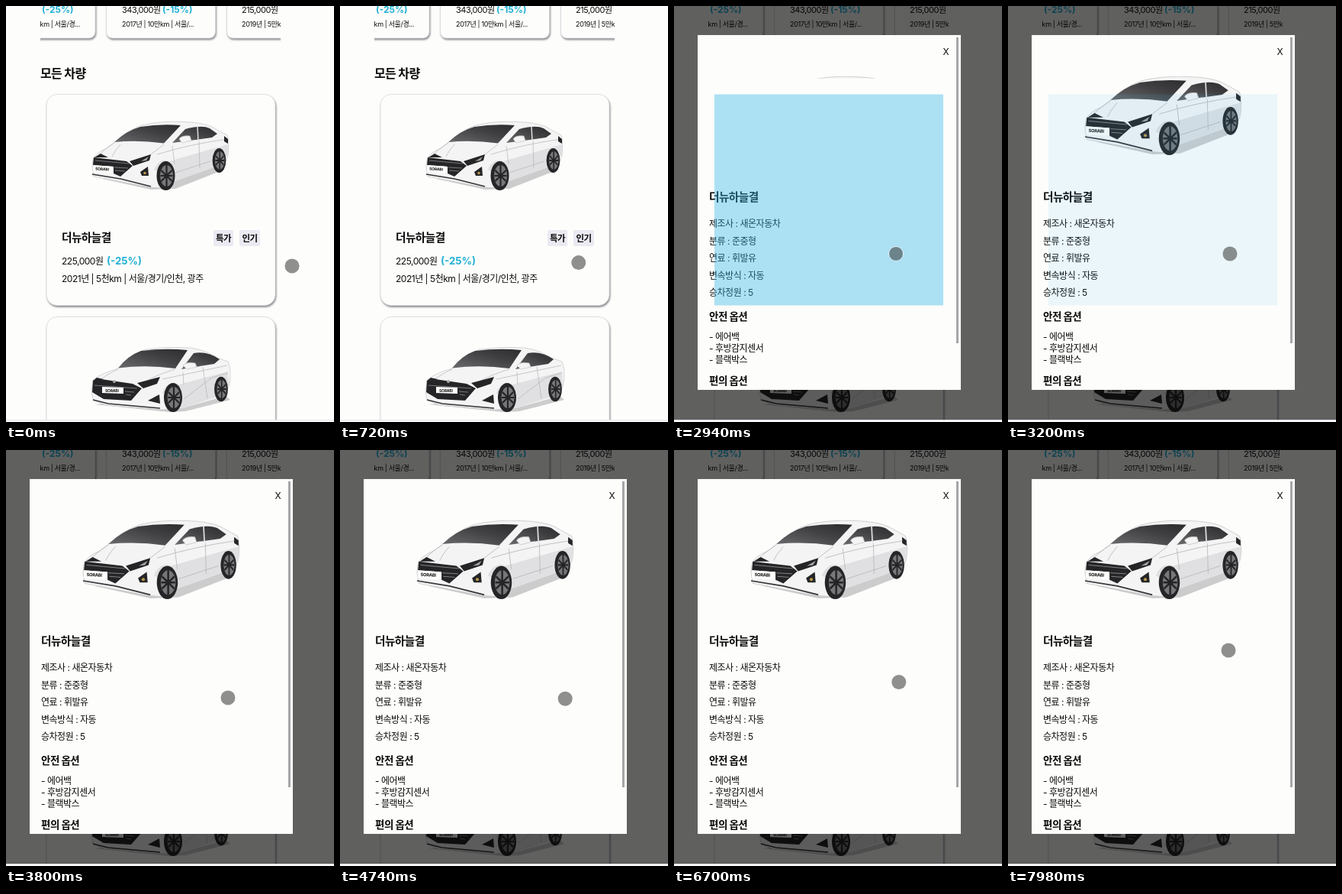
These frames come from a looping animation (430x544 px, 8 s). An HTML page:

```html
<!DOCTYPE html>
<html lang="ko">
<head>
<meta charset="utf-8">
<title>차량 목록</title>
<style>
  html, body { margin: 0; width: 100%; height: 100%; overflow: hidden; background: #fdfdfb; }
  svg { display: block; width: 430px; height: 544px; }
  text { font: 12px Inter, 'Noto Sans CJK KR', 'Noto Sans CJK', sans-serif; letter-spacing: -.04em; fill: #0c0c0c; }
  .title { font-size: 14.7px; font-weight: 700; }
  .head { font-size: 13.5px; font-weight: 700; }
  .small { font-size: 9px; }
  .price { font-size: 11px; }
  .sale { font-size: 13.3px; font-weight: 700; fill: #22b0d6; letter-spacing: 0; }
  .sale.mini { font-size: 12px; }
  .bold { font-weight: 700; }
  .tag { font-size: 11.5px; font-weight: 700; }
  .plate { font-size: 5px; font-weight: 700; }
  .page { fill: #fdfdfb; }
  .card { fill: #fdfdfb; stroke: #d9d9de; stroke-width: .8; filter: drop-shadow(1px 2px 1px rgba(50, 50, 60, .55)); }
  .badge { fill: #ebeaf3; }
  .paint { fill: #f4f4f4; stroke: #c6c6c8; stroke-width: .7; }
  .shade { fill: #e0e0e2; }
  .glass { fill: url(#tint); }
  .dark { fill: #252527; }
  .rim { fill: #77777a; }
  .spokes { stroke: #252527; stroke-width: 2.2; }
  .line { fill: none; stroke: #b4b4b7; stroke-width: .7; }
  .trim { fill: none; stroke: #8c8c90; stroke-width: .8; }
  .lip { fill: none; stroke: #353538; stroke-width: 1.5; }
  .shadow { fill: #a5a5a8; opacity: .55; }
</style>
</head>
<body>
<svg viewBox="0 0 430 544">
  <defs>
    <linearGradient id="tint" x1="0" y1="1" x2="1" y2="0">
      <stop offset="0" stop-color="#6b6b6e"/>
      <stop offset=".6" stop-color="#404043"/>
      <stop offset="1" stop-color="#2c2c2e"/>
    </linearGradient>
    <clipPath id="content"><rect x="45" width="315" height="541"/></clipPath>
    <clipPath id="panel"><rect x="31" y="38" width="345" height="464"/></clipPath>
    <clipPath id="loaded"><rect id="loadedArea" x="95" y="92" width="220" height="0"/></clipPath>
    <g id="wheel">
      <ellipse class="dark" rx="12" ry="19"/>
      <ellipse class="rim" cx="1" rx="8.5" ry="14"/>
      <path class="spokes" d="M1-14V14M-6-7L8 7M-6 7L8-7M-7 0H9"/>
      <ellipse class="dark" cx="1" rx="2" ry="3"/>
    </g>
    <g id="sedan">
      <path class="shadow" d="M126 226L190 240L222 239L286 214L284 204L190 226Z"/>
      <path class="paint" d="M113 211L114 200Q119 191 132 186L144 177Q160 162 178 156Q202 150 232 151.500Q256 152 270 158L290 169Q293 179 291 195L288 203L270 212L222 229L203 238L188 237L115 223Z"/>
      <path class="shade" d="M194 214Q201 198 214 203L228 199L291 181L291 195L270 212L222 229Z"/>
      <path class="glass" d="M142 178Q158 163 176 158Q202 154 229 156L207 179.500Q174 175 142 178Z"/>
      <path class="glass" d="M218 179L235 161Q257 155 267 160L277 167L270 172Z"/>
      <path d="M251 157L252 176" stroke="#dedee0" stroke-width="1.500"/>
      <path class="line" d="M207 181L190 194M142 179Q128 188 121 196M150 181Q142 190 139 197M218 183L221 207M253 177L254 212M198 194Q240 181 290 174M222 218L268 203"/>
      <path class="dark" d="M115 198L158 203L166 209L150 223L141 219L141 210L114 208Z"/>
      <path class="trim" d="M117 202L161 206M142 211L160 212M143 215L156 216"/>
      <path class="dark" d="M162 203L190 194L188 202L167 209ZM116 198L124 193L134 198ZM176 217L186 210L187 222L178 222Z"/>
      <path d="M177 203L187 197L184 202Z" fill="#a4a4a8"/>
      <circle cx="182" cy="218.500" r="1.800" fill="#b99a4c"/>
      <path class="lip" d="M113 220L150 226L190 236"/>
      <path class="page" d="M114 208L141 210L141 219L114 217Z"/>
      <text class="plate" x="117" y="214.500" transform="rotate(3 116 214)">SORABI</text>
      <path class="paint" d="M227 174Q230 169 241 170L243 176L231 179Z"/>
      <path class="dark" d="M286 170L291 174L291 180L286 177Z"/>
      <use href="#wheel" transform="translate(209.500 222)"/>
      <use href="#wheel" transform="translate(279.500 202) scale(.74 .84)"/>
    </g>
    <g id="coupe">
      <path class="shadow" d="M116 521L214 531L235 530L294 515L284 506Z"/>
      <path class="paint" d="M112 502L115 488Q128 479 147 474Q165 455 183 449Q212 445 242 447Q262 450 277 460L291 465Q296 475 293 495L286 511L232 526L204 528L130 522L114 515Z"/>
      <path class="shade" d="M205 506Q211 489 227 495L291 478L292 496L274 512L230 526Z"/>
      <path class="glass" d="M147 473.500Q160 457 177 451Q208 447 238 450L222 474Q184 469 147 473.500Z"/>
      <path class="glass" d="M230 475L246 454Q264 451 280 462L273 468Z"/>
      <path class="line" d="M222 475Q198 482 181 492M147 475Q131 482 124 489M232 479L233 495M258 472L264 513M205 488L290 470M233 514L270 486L291 480"/>
      <path class="dark" d="M114 490L125 488L166 494L178 500L164 516L128 514L113 505Z"/>
      <path class="trim" d="M116 496L172 500M156 504L168 505M157 508L164 509"/>
      <path class="dark" d="M172 493L202 485L198 494L180 500ZM113 491L119 486L128 488ZM186 516L201 508L202 520Z"/>
      <circle cx="142" cy="491" r="2" fill="#a9a9ad"/>
      <path class="lip" d="M114 515L134 520L202 526"/>
      <path class="page" d="M126 498L154 499L154 507L126 506Z"/>
      <text class="plate" x="130" y="504.500">SORABI</text>
      <path class="paint" d="M232 470Q236 465 248 467L250 472L237 475Z"/>
      <use href="#wheel" transform="translate(219 512)"/>
      <use href="#wheel" transform="translate(282 501) scale(.74 .86)"/>
    </g>
  </defs>

  <rect class="page" width="430" height="544"/>
  <g clip-path="url(#content)">
    <rect class="card" x="-27" y="-90" width="144" height="132" rx="8"/>
    <rect class="card" x="131.500" y="-90" width="143" height="132" rx="8"/>
    <rect class="card" x="289.500" y="-90" width="143" height="132" rx="8"/>
    <text class="sale mini" x="47" y="8.500">(-25%)</text>
    <text class="small" x="97" y="27" text-anchor="end">2021년 | 5천km | 서울/경...</text>
    <text class="price" x="152" y="8.500">343,000원</text>
    <text class="sale mini" x="205" y="8.500">(-15%)</text>
    <text class="small" x="152" y="27">2017년 | 10만km | 서울/...</text>
    <text class="price" x="309" y="8.500">215,000원</text>
    <text class="small" x="309" y="27">2019년 | 5만km | 서울/...</text>

    <text class="bold" x="45" y="94" style="font-size:16px">모든 차량</text>
    <rect class="card" x="53" y="115.500" width="300" height="276" rx="14"/>
    <use href="#sedan"/>
    <text class="title" x="73" y="307.500">더뉴하늘결</text>
    <rect class="badge" x="272" y="293" width="26" height="21" rx="2"/>
    <rect class="badge" x="306" y="293" width="27" height="21" rx="2"/>
    <text class="tag" x="285" y="308" text-anchor="middle">특가</text>
    <text class="tag" x="319.500" y="308" text-anchor="middle">인기</text>
    <text x="73" y="338">225,000원</text>
    <text class="sale" x="132" y="338">(-25%)</text>
    <text x="73" y="361">2021년 | 5천km | 서울/경기/인천, 광주</text>
    <rect class="card" x="53" y="406.500" width="300" height="276" rx="14"/>
    <use href="#coupe"/>
  </g>

  <g id="modal">
    <rect width="430" height="541" fill="rgba(0,0,0,.62)"/>
    <g clip-path="url(#panel)">
      <rect class="page" x="31" y="38" width="345" height="464"/>
      <g clip-path="url(#loaded)"><use href="#sedan" transform="translate(-28.400 -80.900) scale(1.145)"/></g>
      <text x="352.500" y="64">X</text>
      <text class="title" x="46" y="255">더뉴하늘결</text>
      <g id="specs"></g>
      <text class="head" x="46" y="411">안전 옵션</text>
      <g id="safety"></g>
      <text class="head" x="46" y="495">편의 옵션</text>
      <rect x="370" y="41" width="3" height="400" fill="#a6a6a8"/>
    </g>
  </g>

  <rect id="tap" x="53" y="115.500" width="300" height="276" fill="rgb(51,181,229)"/>
  <rect class="page" y="541" width="430" height="3"/>
  <rect y="541" width="430" height="1.500" fill="#e9e9f2"/>
  <circle id="pointer" r="9.500" fill="rgba(60,60,60,.57)" stroke="#e0f3fa" stroke-width="0"/>
</svg>
<script>
  const LOOP = 8000;
  const TAP = 2600, OPEN = 2700, RELEASE = 2960;
  const $ = id => document.getElementById(id);
  const clamp = v => Math.max(0, Math.min(1, v));
  const progress = (t, start, length) => clamp((t - start) / length);
  const linear = u => u;
  const easeOut = u => u * (2 - u);
  const smooth = u => u * u * (3 - 2 * u);

  // time, x, y, easing used to arrive
  const pointerPath = [
    [20, 375, 340], [820, 304, 335, linear], [1500, 291, 324, easeOut],
    [4400, 291, 324, linear], [5000, 298, 326, smooth],
    [5900, 298, 326, linear], [7900, 289, 262, smooth]
  ];

  function pointerAt(t) {
    const next = pointerPath.findIndex(key => key[0] > t);
    if (next === 0) return pointerPath[0].slice(1, 3);
    if (next < 0) return pointerPath.at(-1).slice(1, 3);
    const [t0, x0, y0] = pointerPath[next - 1];
    const [t1, x1, y1, ease] = pointerPath[next];
    const u = ease(progress(t, t0, t1 - t0));
    return [x0 + (x1 - x0) * u, y0 + (y1 - y0) * u];
  }

  function addLines(id, lines, top, step) {
    $(id).innerHTML = lines.map((line, i) => `<text x="46" y="${top + i * step}">${line}</text>`).join('');
  }
  addLines('specs', ['제조사 : 새온자동차', '분류 : 준중형', '연료 : 휘발유', '변속방식 : 자동', '승차정원 : 5'], 289, 22.5);
  addLines('safety', ['- 에어백', '- 후방감지센서', '- 블랙박스'], 437, 15);

  function draw() {
    const t = performance.now() % LOOP;
    const [x, y] = pointerAt(t);
    $('pointer').setAttribute('transform', `translate(${x} ${y})`);
    $('pointer').setAttribute('stroke-width', t >= TAP && t < RELEASE ? 1 : 0);
    $('modal').setAttribute('visibility', t < OPEN ? 'hidden' : 'visible');
    $('loadedArea').setAttribute('height', 110 * progress(t, 2936, 200));
    $('tap').setAttribute('opacity', t < TAP ? 0 : .4 * (1 - progress(t, RELEASE, 310)));
    requestAnimationFrame(draw);
  }
  draw();
</script>
</body>
</html>
```
